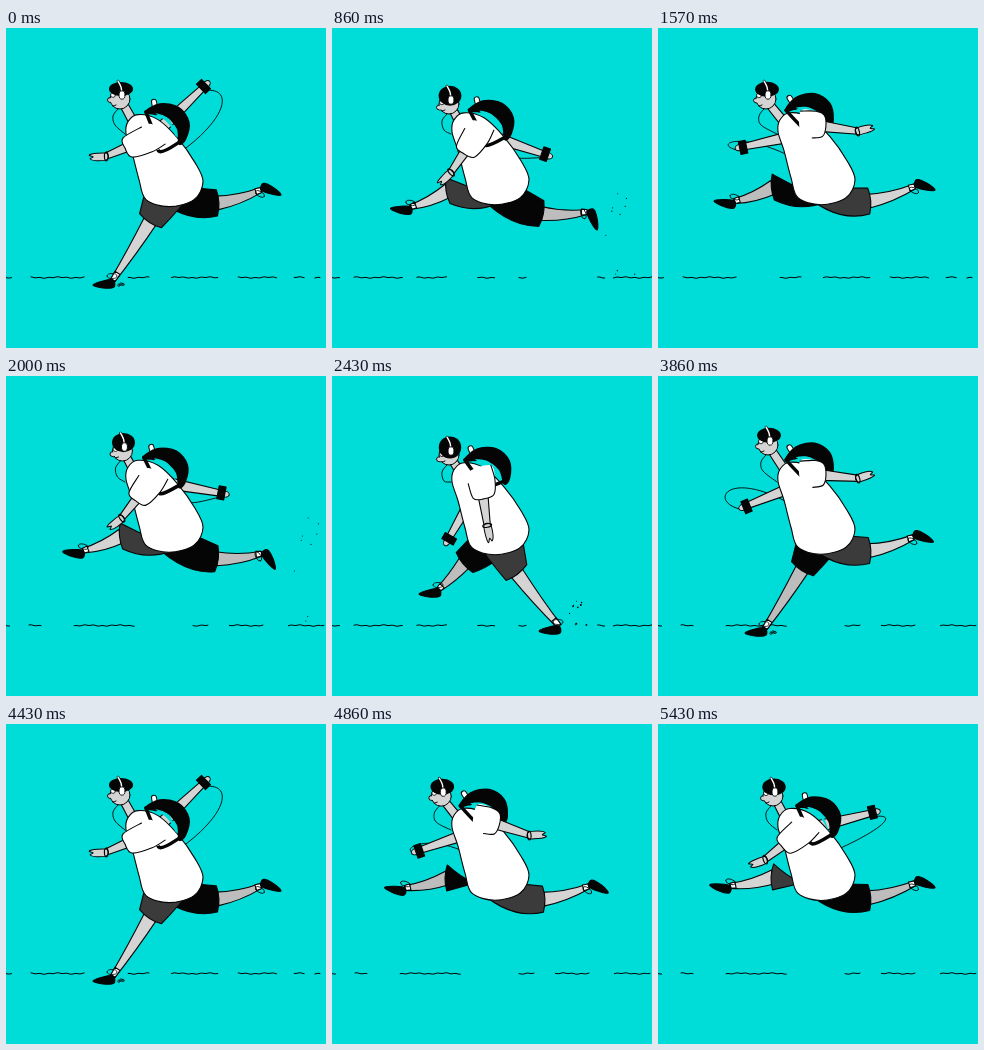
Animation, 320 px wide and 320 px high, one loop 5.57 s. Source, as an HTML page with a canvas:

```html
<!DOCTYPE html>
<html lang="en">
<head>
<meta charset="utf-8">
<title>Runner</title>
<style>
  html, body { margin: 0; width: 100%; height: 100%; overflow: hidden; background: #00dcd8; }
  canvas { display: block; }
</style>
</head>
<body>
<canvas id="stage" width="320" height="320"></canvas>
<script>
const ctx = document.getElementById('stage').getContext('2d');
const LOOP = 5570, STEPS = 39, STRIDE = 31 / 4;
const TEAL = '#00dcd8', INK = '#050505', SKIN = '#d4d4d4', FAR_SKIN = '#bdbdbd', GREY = '#3c3b3c', WHITE = '#fff';
const { PI, cos, sin, abs, hypot, floor } = Math;

// Phase in the stride, near arm and far arm in degrees, head x, y and nod.
const BODY = [
  [0, 157, -44, 114, 66, 0],
  [.194, 82, 120, 117, 74, .8],
  [.419, 8, 168, 108, 66, .1],
  [.484, 5, 158, 110, 64, .1],
  [.774, 124, 19, 117, 71, .6],
  [.903, 142, -14, 115, 67, .3]
];

// Phase after touchdown, ankle x and y, foot direction in degrees.
const STEP = [
  [0, 107, 252, 180],
  [.194, 227, 250, 180],
  [.274, 255, 184, 75],
  [.41, 257, 158, 24],
  [.5, 255, 162, 28],
  [.6, 190, 205, 90],
  [.694, 107, 213, 180],
  [.774, 79, 179, 190],
  [.91, 72, 161, 197],
  [.98, 107, 252, 180]
];

const TORSO = [120,105, 122,93, 132,86, 152,91, 172,110, 189,134, 197,153, 188,171, 163,178, 140,171, 133,151, 126,124];

// Dash and gap lengths of the three ground drawings.
const GROUND = [
  [6, 19, 55, 44, 22, 22, 48, 20, 40, 17, 11, 10],
  [8, 14, 50, 14, 31, 31, 18, 24, 8, 72, 8, 8, 34, 0],
  [4, 19, 13, 33, 62, 59, 16, 21, 35, 25, 33, 0]
];

function blend(keys, phase) {
  let i = keys.length - 1;
  while (keys[i][0] > phase + .0006) i--;
  const [start, ...a] = keys[i], [next, ...b] = keys[(i + 1) % keys.length];
  const u = Math.max(0, (phase - start) / ((next > start ? next : next + 1) - start));
  return a.map((v, j) => v + (b[j] - v) * u);
}

function paint(fill, line, width = 1.1) {
  if (fill) { ctx.fillStyle = fill; ctx.fill(); }
  if (line) { ctx.strokeStyle = line; ctx.lineWidth = width; ctx.stroke(); }
}

// Smooth curve through flat x,y points.
function curve(flat, closed) {
  const n = flat.length / 2;
  const at = i => {
    const j = closed ? (i + n) % n : Math.min(n - 1, Math.max(0, i));
    return [flat[2 * j], flat[2 * j + 1]];
  };
  ctx.beginPath();
  ctx.moveTo(...at(0));
  for (let i = 0; i < (closed ? n : n - 1); i++) {
    const [p, a, b, q] = [at(i - 1), at(i), at(i + 1), at(i + 2)];
    ctx.bezierCurveTo(a[0] + (b[0] - p[0]) / 6, a[1] + (b[1] - p[1]) / 6,
                      b[0] - (q[0] - a[0]) / 6, b[1] - (q[1] - a[1]) / 6, ...b);
  }
  if (closed) ctx.closePath();
}

function limb(x1, y1, x2, y2, w1, w2, fill, sag = 0) {
  const d = hypot(x2 - x1, y2 - y1) || 1;
  const nx = (y1 - y2) / d / 2, ny = (x2 - x1) / d / 2;
  const mx = (x1 + x2) / 2, my = (y1 + y2) / 2 + sag, wm = (w1 + w2) / 2;
  ctx.beginPath();
  ctx.moveTo(x1 + nx * w1, y1 + ny * w1);
  ctx.quadraticCurveTo(mx + nx * wm, my + ny * wm, x2 + nx * w2, y2 + ny * w2);
  ctx.lineTo(x2 - nx * w2, y2 - ny * w2);
  ctx.quadraticCurveTo(mx - nx * wm, my - ny * wm, x1 - nx * w1, y1 - ny * w1);
  ctx.closePath();
  paint(fill, INK);
}

function oval(x, y, rx, ry, fill, line, width) {
  ctx.beginPath();
  ctx.ellipse(x, y, rx, ry, 0, 0, 7);
  paint(fill, line, width);
}

function stroke(width, color, ...points) {
  curve(points);
  paint(null, color, width);
}

// Runs a drawing in a frame moved to x, y and turned.
function local(x, y, angle, drawPart) {
  ctx.save();
  ctx.translate(x, y);
  ctx.rotate(angle);
  drawPart();
  ctx.restore();
}

function drawLeg(phase, skin, shorts) {
  const [x, y, foot] = blend(STEP, phase);
  const d = hypot(x - 163, y - 166), dx = (x - 163) / d, dy = (y - 166) / d;
  const thigh = 28 + 20 * dx * dx;
  const kx = 163 + dx * thigh, ky = 166 + dy * thigh + 11 * dx ** 3;
  limb(kx, ky, x, y, 14, 5, skin, 4 * abs(dx));
  limb(x + (kx - x) * .12, y + (ky - y) * .12, x, y, 6, 5, WHITE);

  local(x, y, foot * PI / 180, () => {
    oval(1, 4, 5, 2.5, null, INK, .8);
    curve([0, 0, 10, -1, 20, -5, 10, -8, -1, -7], true);
    paint(INK, INK);
  });

  const sag = run => Math.max(0, (abs(run) - 30) * .55);
  const ax = kx - dy * 13, ay = ky + dx * 13, bx = kx + dy * 13, by = ky - dx * 13;
  ctx.beginPath();
  ctx.moveTo(140, 160);
  // The lower corner of a raised thigh hangs from the far hip.
  const [fx, fy, rx, ry] = ax < bx || dx > 0 ? [ax, ay, bx, by] : [bx, by, ax, ay];
  ctx.quadraticCurveTo((140 + fx) / 2, (160 + fy) / 2 + sag(fx - 140), fx, fy);
  ctx.quadraticCurveTo(kx + dx * 4, ky + dy * 4, rx, ry);
  ctx.quadraticCurveTo((190 + rx) / 2, (160 + ry) / 2 + sag(rx - 190), 190, 160);
  ctx.closePath();
  paint(shorts, INK);
}

function drawHead(x, y, nod) {
  limb(x + 4, y + 11, 130, 99, 8, 9, SKIN);
  stroke(.9, INK, x - 2, y + 15, x - 7, y + 22, x - 5, y + 31, 119, 106);
  oval(x - 9, y + 6 + 4 * nod, 3.5, 2.6, SKIN, INK, 1);
  oval(x, y + 5, 10, 10, SKIN, INK, 1);
  oval(x - 8, y + 6 + 4 * nod, 3, 2, SKIN);
  oval(x - 7, y + 1 + 4 * nod, 2.4, 2.4, WHITE, INK, .8);
  stroke(1, INK, x - 7, y + 12, x - 4, y + 11);
  oval(x + 1, y - 5 + 3 * nod, 12 - nod, 7 + 5 * nod, INK);
  stroke(2.6, INK, x + 2, y, x + 1, y - 7, x - 2, y - 13);
  stroke(1.4, WHITE, x + 2, y, x + 1, y - 7, x - 2, y - 13);
  oval(x + 2, y + 1, 3, 4.2, WHITE, INK, .9);
}

function drawFarArm(angle, phase) {
  const c = cos(angle), x = 150 + 67 * c, y = 105 + 67 * sin(angle);
  const slack = cos(2 * PI * phase) ** 2, end = 153 + 26 * c;
  ctx.beginPath();
  ctx.moveTo(x, y + 4);
  ctx.bezierCurveTo(x + 42 * c * slack, y, end + 70 * c * slack, 136 - 45 * slack, end, 126);
  paint(null, INK, .9);
  limb(150, 105, x, y, 13, 6, SKIN);
  local(x, y, angle, () => {
    oval(2, 0, 5.5, 3.2, SKIN, INK, 1);
    ctx.beginPath();
    ctx.rect(-4, -7, 7, 13);
    paint(INK, INK);
  });
}

function drawNearArm(angle, reach) {
  const x = 148 - 6 * reach, y = 104 + 6 * reach, cuff = 20 + 6 * reach;
  local(x, y, angle, () => {
    limb(8, 0, 47, 0, 11, 6, SKIN);
    local(47, 0, reach * .4, () => {
      curve([-2, -3, 8, -4, 15, -2, 12, 0, 16, 2, 8, 3.5, -2, 3], true);
      paint(SKIN, INK, 1);
      oval(-1, 0, 1.8, 4.5, null, INK, 1.2);
    });
    const sleeve = [-13, -12, 2, -14, cuff - 3, -11, cuff, 0, cuff - 2, 10, 2, 13, -10, 10];
    curve(sleeve, true);
    paint(WHITE);
    curve(sleeve.slice(0, 12));
    paint(null, INK);
  });
}

function drawPack(reach) {
  const x = 154 + 4 * reach, y = 94 + 4 * reach, tilt = (28 + 12 * reach) * PI / 180;
  const c = cos(tilt), s = sin(tilt);
  stroke(3.5, INK, x - 23 * c, y - 23 * s, 148, 104,
         154, 112 + 12 * reach, x + 23 * c, y + 23 * s);
  local(x, y, tilt, () => {
    stroke(6, INK, -23, -13, -15, -6);
    stroke(4, WHITE, -23, -13, -15, -6);
    curve([-23, 1, -17, -15, 0, -24, 17, -19, 25, -4, 23, 4, 12, -7, -6, -9], true);
    paint(INK, INK, 1.5);
    curve([-14, -5, 0, -9, 18, 1, 2, -5], true);
    paint(TEAL);
  });
}

function drawGround(dashes) {
  ctx.beginPath();
  for (let x = 0; x <= 320; x += 2)
    ctx.lineTo(x, 249.5 + .4 * sin(x * .7) + .4 * sin(x * .21));
  ctx.setLineDash(dashes);
  ctx.lineCap = 'butt';
  paint(null, INK, 1);
  ctx.setLineDash([]);
  ctx.lineCap = 'round';
}

function drawDust(phase) {
  const half = phase % .5, age = half - .16;
  const random = i => abs(sin(i * 78.233 + 1) * 43758.5453) % 1;
  if (age > 0 && age < .16)
    for (let i = 0; i < 10; i++) {
      const size = .5 + .7 * random(i + 40) * (1 - age / .16);
      oval(220 + 420 * age + (20 + 250 * age) * random(i), 250 - 800 * age * random(i + 20), size, size, INK);
    }
  if (half < .04 || half > .48)
    for (let i = 0; i < 3; i++)
      oval(113 + i * 2, 255 + 4 * random(i), 1.2, 1.2, null, INK, .8);
}

function draw(step) {
  const phase = step / STRIDE % 1;
  const [near, far, headX, headY, nod] = blend(BODY, phase);
  const nearAngle = near * PI / 180, farAngle = far * PI / 180;
  const reach = -cos(nearAngle);
  const bob = 2 * cos(4 * PI * (phase - .1));

  ctx.fillStyle = TEAL;
  ctx.fillRect(0, 0, 320, 320);
  drawGround(GROUND[floor(step * 1.65 + .15) % 3]);
  drawDust(phase);
  drawFarArm(farAngle, phase);
  drawHead(headX, headY, nod);
  drawLeg((phase + .5) % 1, FAR_SKIN, INK);
  drawLeg(phase, SKIN, GREY);
  local(0, bob, 0, () => {
    curve(TORSO, true);
    paint(WHITE, INK);
    drawPack(reach);
    drawNearArm(nearAngle, reach);
  });
}

ctx.lineCap = ctx.lineJoin = 'round';
function tick() {
  const time = performance.now() % LOOP;
  draw(floor((time + 5) * STEPS / LOOP) % STEPS);
  requestAnimationFrame(tick);
}
tick();
</script>
</body>
</html>
```
